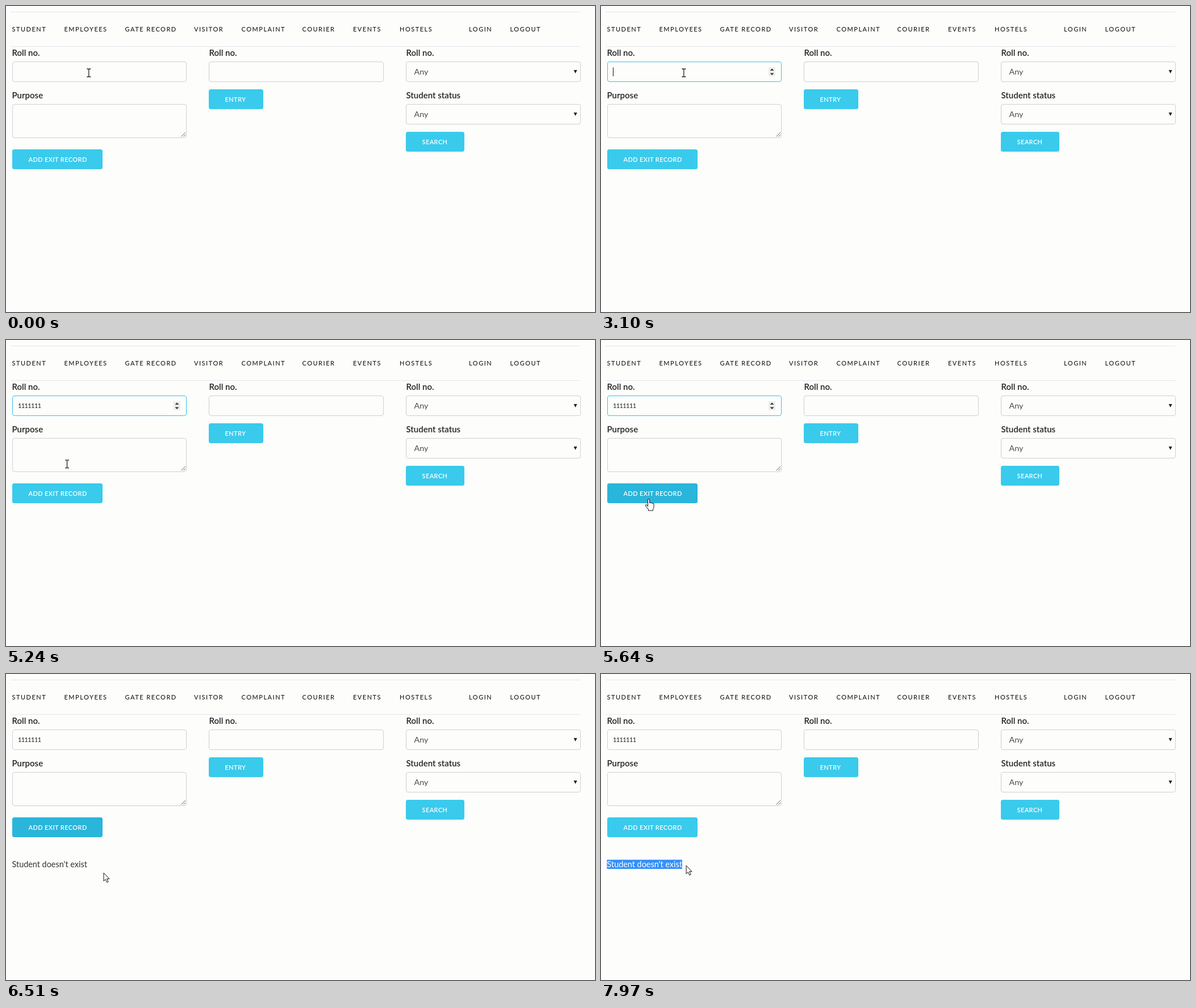
Write an HTML page that moves like this. It is 1037 px wide and 540 px high and loops after 8 s.

```html
<!DOCTYPE html>
<html lang="en">
<head>
<meta charset="utf-8">
<title>Gate record</title>
<style>
  html, body { margin: 0; width: 100%; height: 100%; overflow: hidden; background: #fdfdfb; }
  svg { display: block; width: 1037px; height: 540px; font-family: Lato, "Open Sans", sans-serif; }
  text { white-space: pre; }
  .nav { font-size: 11px; font-weight: 500; letter-spacing: 1.5px; fill: #1c1c1c; }
  .label { font-size: 15px; font-weight: 600; fill: #222; }
  .value { font-size: 14.3px; fill: #4a4a4a; }
  .digits { font-size: 11px; letter-spacing: -.6px; fill: #222; }
  .message { font-size: 14.4px; fill: #333; }
  .button { fill: #3acaec; }
  .button.active { fill: #2ab5da; }
  .caption { font-size: 11px; font-weight: 600; letter-spacing: .4px; fill: #fff; }
  .field { fill: none; stroke: #cfcfd9; }
  .field.focus { stroke: #33c3f0; }
  .rule { stroke: #e6e6ef; }
  .pointer { fill: #fff; stroke: #111; stroke-linejoin: round; }
</style>
</head>
<body>
<svg id="stage" viewBox="0 0 1037 540">
  <path class="rule" d="M8 10.5H1011M8 71.5H1011"/>
  <g id="form"></g>
  <path d="M308.5 230.5L316 223M312.5 230.5L316 227" stroke="#666"/>
  <g id="focusParts">
    <rect x="295" y="108" width="12" height="16" fill="#eee"/>
    <path d="M297.5 114L301 110.5L304.5 114ZM297.5 118.5L301 122L304.5 118.5Z" fill="#333"/>
    <path id="caret" d="M0 108.5V124" stroke="#111"/>
  </g>
  <text id="digits" class="digits" x="21" y="120"></text>
  <g id="result">
    <text id="message" class="message" x="10.5" y="340.5">Student doesn't exist</text>
    <clipPath id="selectedArea"><rect id="clipRect" y="327.5" height="16.5"/></clipPath>
    <g clip-path="url(#selectedArea)">
      <rect y="327.5" width="400" height="16.5" fill="#3390fb"/>
      <text class="message" x="10.5" y="340.5" style="fill:#fff">Student doesn't exist</text>
    </g>
  </g>
  <g id="cursor">
    <path id="ibeam" d="M-3.5 -7H-1L0 -6L1 -7H3.5M0 -6V6M-3.5 7H-1L0 6L1 7H3.5" fill="none" stroke="#222" stroke-width="1.3"/>
    <path id="arrow" class="pointer" d="M.5 .5V15L3.8 11.8L6.2 17.3L8.6 16.2L6.2 11H10.5Z"/>
    <path id="hand" class="pointer" d="M-1.5 13V1.6Q-1.3 0 0 0T1.5 1.6V7Q3 5.6 4.3 7.2Q6 6.2 7 8Q9 7.4 9 9.6V14Q9 16.5 7.5 18V20.5H-.5V18.5L-4.5 13.5Q-6.5 11 -5 10Q-3.5 9.6 -1.5 13Z"/>
  </g>
</svg>
<script>
const LOOP = 8000;
const byId = id => document.getElementById(id);
const form = byId('form');

function add(tag, attributes, content = '') {
  const node = document.createElementNS('http://www.w3.org/2000/svg', tag);
  for (const name in attributes) node.setAttribute(name, attributes[name]);
  node.textContent = content;
  form.append(node);
  return node;
}
const write = (kind, x, y, content) => add('text', { class: kind, x, y }, content);
const box = (kind, x, y, width, height) =>
  add('rect', { class: kind, x, y, width, height, rx: 3.5 });

function button(x, y, width, caption) {
  const node = box('button', x, y, width, 35);
  write('caption', x + 28.5, y + 21.7, caption);
  return node;
}
function select(y) {
  box('field', 704.5, y, 307, 35);
  write('value', 718.5, y + 22, 'Any');
  add('path', { d: `M999.5 ${y + 14.5}h6l-3 6z`, fill: '#222' });
}

[['STUDENT', 10.5], ['EMPLOYEES', 102.5], ['GATE RECORD', 209.5], ['VISITOR', 331],
 ['COMPLAINT', 414.5], ['COURIER', 521.5], ['EVENTS', 611], ['HOSTELS', 693],
 ['LOGIN', 815], ['LOGOUT', 887.5]].forEach(([name, x]) => write('nav', x, 44.7, name));

for (const x of [10.5, 357.5, 704.5]) write('label', x, 87.5, 'Roll no.');
write('label', 10.5, 162.8, 'Purpose');
write('label', 704.5, 162.8, 'Student status');
const rollField = box('field', 11.5, 98.5, 306, 35);
box('field', 11.5, 173.5, 306, 59);
box('field', 357.5, 98.5, 307, 35);
select(98.5);
select(173.5);
const exitButton = button(11, 253, 159, 'ADD EXIT RECORD');
button(357, 147, 96, 'ENTRY');
button(704, 222, 103, 'SEARCH');

// Moments of the interaction, in ms
const focusAt = 3000, clickAt = 5760, messageAt = 5980, dragAt = 6770, releaseAt = 7480;
const keyTimes = [3640, 3820, 4000, 4180, 4370, 4530, 4700];

// Pointer path: time, x, y
const path = [
  [0, 145.8, 118], [4900, 145.8, 118], [5450, 84, 280.5], [5760, 84, 280.5],
  [5870, 98, 297], [6300, 171.5, 350.5], [6560, 171.5, 350.5], [6770, 148, 341],
  [7070, 22, 345], [7180, 4, 345], [7560, 4, 346], [7900, 149.5, 338], [8000, 149.5, 337.5]
];

function pointerAt(t) {
  const i = path.findIndex(step => step[0] > t);
  const [t0, x0, y0] = path[i - 1], [t1, x1, y1] = path[i];
  const k = (t - t0) / (t1 - t0);
  return { x: x0 + (x1 - x0) * k, y: y0 + (y1 - y0) * k };
}
const inside = (p, x0, y0, x1, y1) => p.x >= x0 && p.x <= x1 && p.y >= y0 && p.y <= y1;
const show = (id, on) => { byId(id).style.display = on ? '' : 'none'; };

// The selection starts at the left edge of the letter under the pointer.
function selectionEdges(x) {
  const message = byId('message');
  const last = message.getNumberOfChars() - 1;
  const end = message.getEndPositionOfChar(last).x;
  if (x >= end) return [end, end];
  let start = message.getStartPositionOfChar(0).x;
  for (let i = 1; i <= last; i++) {
    const edge = message.getStartPositionOfChar(i).x;
    if (edge <= x) start = edge;
  }
  return [start, end];
}

function render(t) {
  const focused = t >= focusAt && t < clickAt;
  const typed = keyTimes.filter(time => time <= t);
  const digits = byId('digits');
  digits.textContent = '1'.repeat(typed.length);
  rollField.classList.toggle('focus', focused);
  show('focusParts', focused);
  const lastInput = typed.length ? typed[typed.length - 1] : focusAt;
  show('caret', Math.floor((t - lastInput) / 500) % 2 === 0);
  const caretX = typed.length ? Math.round(21 + digits.getComputedTextLength()) + .5 : 21.5;
  byId('caret').setAttribute('transform', `translate(${caretX})`);

  const p = pointerAt(t);
  const overButton = inside(p, 11, 253, 170, 288);
  const overField = inside(p, 11, 98, 318, 134) || inside(p, 11, 173, 318, 233);
  const dragging = t >= dragAt && t < releaseAt;
  const shape = overButton ? 'hand' : overField || dragging ? 'ibeam' : 'arrow';
  for (const id of ['hand', 'ibeam', 'arrow']) show(id, id === shape);
  byId('cursor').setAttribute('transform', `translate(${p.x.toFixed(1)} ${p.y.toFixed(1)})`);
  exitButton.classList.toggle('active', overButton || (t >= clickAt && t < dragAt));

  show('result', t >= messageAt);
  if (t >= messageAt) {
    const [start, end] = selectionEdges(t < dragAt ? 1000 : dragging ? p.x : 0);
    byId('clipRect').setAttribute('x', start);
    byId('clipRect').setAttribute('width', end - start);
  }
}

const begin = performance.now();
function tick() {
  render((performance.now() - begin) % LOOP);
  requestAnimationFrame(tick);
}
tick();
</script>
</body>
</html>
```
